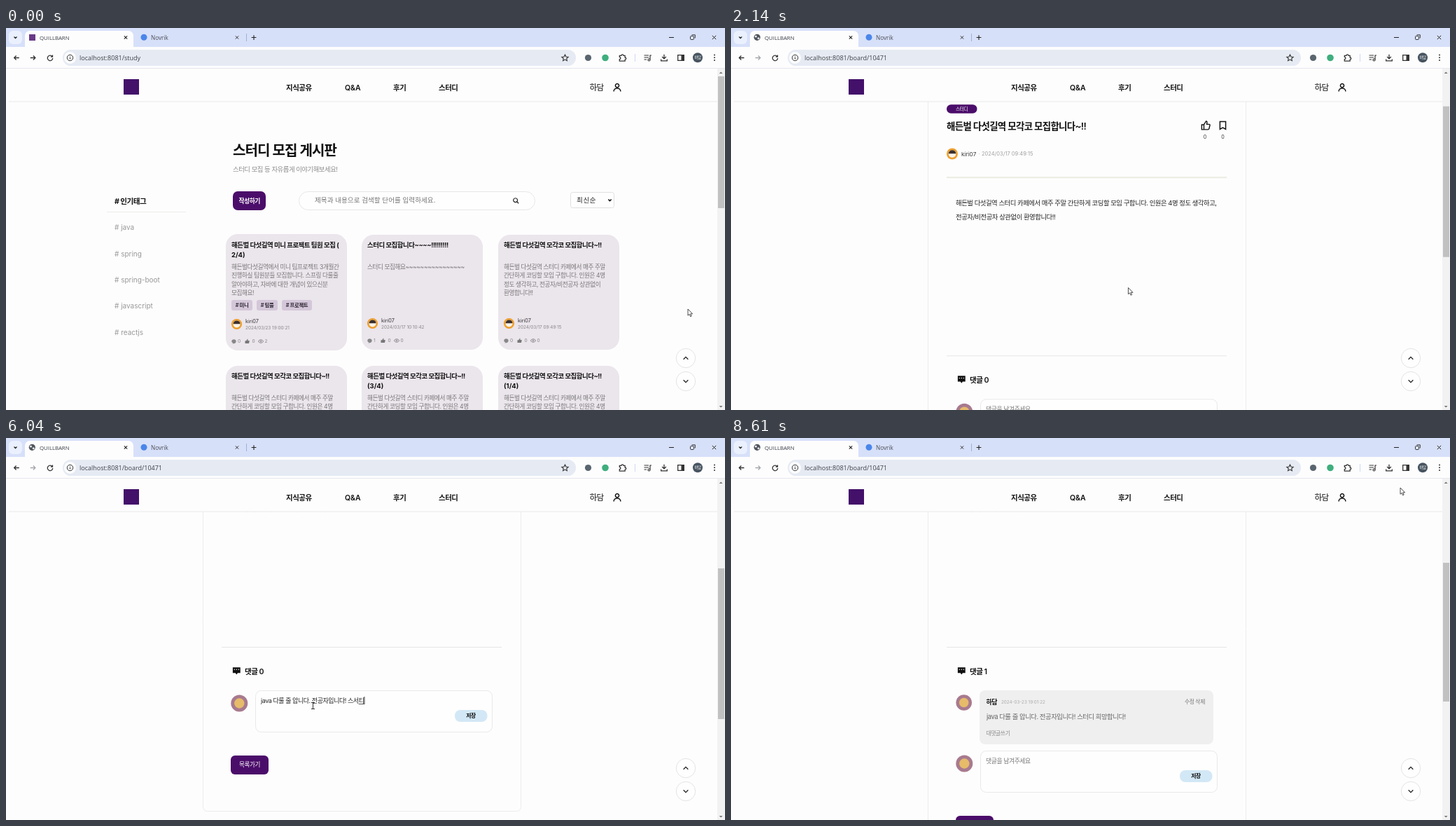
An HTML page with a canvas for the animation above (8.64 s loop, 1027 by 545 pixels).

```html
<!DOCTYPE html>
<html lang="ko">
<head>
<meta charset="utf-8">
<title>Study board</title>
<style>
  html, body { margin: 0; width: 100%; height: 100%; overflow: hidden; background: #fdfdfd; }
  canvas { display: block; width: 1027px; height: 545px; }
</style>
</head>
<body>
<canvas id="stage"></canvas>
<script>
const W = 1027, H = 545, LOOP = 8640;
const canvas = document.getElementById('stage');
const ctx = canvas.getContext('2d');
const dpr = window.devicePixelRatio || 1;
canvas.width = W * dpr;
canvas.height = H * dpr;

const PAGE_FONT = 'Inter, "Noto Sans CJK KR", "Noto Sans CJK", sans-serif';
const UI_FONT = '"Open Sans", "Noto Sans CJK KR", sans-serif';
const PURPLE = '#4b0d6a', PAGE = '#fdfdfd', GRAY = '#777', INK = '#111';
const SITE = 'QUILLBARN', MEMBER = '하담', AUTHOR = 'kiri07', STATION = '해든벌 다섯길역';
const CODING = STATION + ' 모각코 모집합니다~!!';

// Timeline in ms
const OPEN = 1150, DETECT = 1700, FOCUS = 2850, RELOAD = 7450, DETECT2 = 7700;
const SCROLL = 267;

const ICON = {
  star: 'M12 3l2.8 6 6.5.7-4.9 4.4 1.4 6.4-5.8-3.3-5.8 3.3 1.4-6.4L2.7 9.7 9.2 9z',
  thumb: 'M8 10v11H3V10zM8 10l5-8c2 0 2.5 1.5 2 3.5L14.5 9H20c1 0 2 1 1.7 2.2l-2 8c-.2 1-1 1.8-2 1.8H8',
  mark: 'M5 2h14v19l-7-4-7 4z',
  chat: 'M2 3h20v15h-7l-3 4-3-4H2z',
  bubble: 'M12 3C-1 3-1 19 9 19l-5 3c16 1 18-5 18-11 0-5-4-8-10-8z',
  eye: 'M1 12c5-9 17-9 22 0c-5 9-17 9-22 0zM12 9a3 3 0 1 0 .01 0z',
  user: 'M12 2a4.8 4.8 0 1 0 .01 0zM3 22c0-11 18-11 18 0',
  search: 'M10 3a7 7 0 1 0 .01 0zM15.5 15.5L21 21',
  back: 'M21 12H4M11 5l-7 7 7 7',
  next: 'M3 12h17M13 5l7 7-7 7',
  reload: 'M19 8A8.5 8.5 0 1 0 20.5 13M20 3v6h-6',
  puzzle: 'M4 6h5a3 3 0 1 1 6 0h4v5a3 3 0 1 1 0 6v4H4v-5a3 3 0 0 0 0-6z',
  list: 'M2 5h13M2 11h13M2 17h7M19 18V5h4M13 18a3 3 0 1 0 6 0 3 3 0 1 0-6 0',
  save: 'M12 2v13M6 9l6 6 6-6M3 16v5h18v-5',
  panel: 'M3 4h18v16H3z',
  up: 'M4 16l8-8 8 8',
  down: 'M4 8l8 8 8-8',
  close: 'M4 4l16 16M20 4L4 20',
  plus: 'M12 3v18M3 12h18'
};
for (const k in ICON) ICON[k] = new Path2D(ICON[k]);
const ARROW = new Path2D('M0 0v9.2l2.1-1.9 1.5 3.4 1.6-.7-1.5-3.2h2.9z');

function text(s, x, y, size, color = INK, weight = 400, o = {}) {
  const track = o.track ?? (/[가-힣]/.test(s) && o.font !== UI_FONT ? -0.05 : 0);
  ctx.font = `${weight} ${size}px ${o.font || PAGE_FONT}`;
  ctx.letterSpacing = track * size + 'px';
  ctx.textAlign = o.align || 'left';
  ctx.fillStyle = color;
  ctx.fillText(s, x, y + size * 0.37);
}

function box(x, y, w, h, r, fill, stroke) {
  ctx.beginPath();
  ctx.roundRect(x, y, w, h, r);
  if (fill) { ctx.fillStyle = fill; ctx.fill(); }
  if (stroke) { ctx.strokeStyle = stroke; ctx.lineWidth = 1; ctx.stroke(); }
}

function disc(x, y, r, fill, stroke) {
  box(x - r, y - r, 2 * r, 2 * r, r, fill, stroke);
}

function icon(name, x, y, size, color = '#222', width = 1.2, fill = false) {
  ctx.save();
  ctx.translate(x - size / 2, y - size / 2);
  ctx.scale(size / 24, size / 24);
  ctx.lineWidth = width * 24 / size;
  ctx.strokeStyle = ctx.fillStyle = color;
  if (fill) ctx.fill(ICON[name]); else ctx.stroke(ICON[name]);
  ctx.restore();
}

function authorPic(x, y, r) {
  disc(x, y, r, '#eda02f');
  disc(x, y, r * 0.66, '#fbf4ea');
  ctx.beginPath();
  ctx.arc(x, y, r * 0.66, Math.PI * 1.02, Math.PI * 1.98);
  ctx.fillStyle = '#3a3030';
  ctx.fill();
}

function memberPic(x, y, r) {
  disc(x, y, r, '#a87a8f');
  disc(x, y, r * 0.6, '#e6bb6a');
}

const ease = p => p * p * (3 - 2 * p);
const ramp = (t, a, b) => ease(Math.min(1, Math.max(0, (t - a) / (b - a))));

// Keystroke states, building each Hangul syllable from its letters
function keys(base, s) {
  const lead = 'ㄱㄲㄴㄷㄸㄹㅁㅂㅃㅅㅆㅇㅈㅉㅊㅋㅌㅍㅎ', out = [];
  for (const ch of s) {
    const c = ch.charCodeAt(0) - 0xAC00;
    if (c >= 0 && c < 11172) {
      out.push(base + lead[Math.floor(c / 588)]);
      if (c % 28) out.push(base + String.fromCharCode(0xAC00 + c - c % 28));
    }
    out.push(base += ch);
  }
  return out;
}

const PART1 = 'java 다룰 줄 압', PART2 = PART1 + '니다. 전공자입니다! 스';
const REPLY = PART2 + '터디 희망합니다!';
const TYPING = [
  [3050, 4240, keys('', PART1)],
  [4240, 6060, keys(PART1, '니다. 전공자입니다! 스서티')],
  [6060, 7060, [PART2 + '서ㅌ', PART2 + '서', PART2 + 'ㅅ', PART2, ...keys(PART2, '터디 희망합니다!')]]
];

function typed(t) {
  let s = '';
  for (const [a, b, list] of TYPING) {
    if (t >= a) s = list[Math.min(list.length - 1, Math.floor((t - a) / (b - a) * list.length))];
  }
  return s;
}

const TRAIL = [
  [0, 974, 401], [120, 974, 401], [850, 775, 350], [1150, 768, 348], [1500, 670, 352],
  [1900, 610, 362], [2400, 520, 380], [2800, 438, 382], [7060, 438, 382], [7300, 664, 394],
  [7430, 664, 394], [7810, 836, 135], [8550, 956, 71], [LOOP, 956, 71]
];

function pointer(t) {
  const i = TRAIL.findIndex(p => p[0] > t);
  const a = TRAIL[i - 1], b = TRAIL[i], p = ramp(t, a[0], b[0]);
  return [a[1] + (b[1] - a[1]) * p, a[2] + (b[2] - a[2]) * p];
}

const CALL = [STATION + ' 스터디 카페에서 매주 주말', '간단하게 코딩할 모임 구합니다. 인원은 4명',
  '정도 생각하고, 전공자/비전공자 상관없이', '환영합니다!!'];
const CARDS = [
  { x: 314, y: 295, title: [STATION + ' 미니 프로젝트 팀원 모집 (', '2/4)'],
    body: [STATION.replace(' ', '') + '에서 미니 팀프로젝트 3개월간', '진행하실 팀원분들 모집합니다. 스프링 다룰줄',
      '알아야하고, 자바에 대한 개념이 있으신분', '모집해요!'],
    date: '2024/03/23 19:00:21', chats: 0, views: 2, tags: true },
  { x: 508, y: 295, title: ['스터디 모집합니다~~~~!!!!!!!!!'], body: ['스터디 모집해요' + '~'.repeat(16)],
    date: '2024/03/17 10:10:42', chats: 1, views: 0 },
  { x: 703, y: 295, title: [CODING], body: CALL, date: '2024/03/17 09:49:15', chats: 0, views: 0 },
  { x: 314, y: 482, title: [CODING], body: CALL },
  { x: 508, y: 482, title: [CODING, '(3/4)'], body: CALL },
  { x: 703, y: 482, title: [CODING, '(1/4)'], body: CALL }
];

function drawCard({ x, y, title, body, date, chats, views, tags }) {
  const grow = tags ? 1 : 0, d = y + grow;
  box(x, y - grow, 173, 164 + 2 * grow, 17, '#ebe5ec');
  title.forEach((s, i) => text(s, x + 8, y + 14.7 + i * 13.6, 9.45, INK, 700));
  body.forEach((s, i) => text(s, x + 8, y + 46 + i * 12.2, 8.65, GRAY));
  if (tags) {
    [['# 미니', 8, 30], ['# 팀플', 44, 30], ['# 프로젝트', 80, 43]].forEach(([s, dx, w]) => {
      box(x + dx, y + 93, w, 15, 3, '#d3c7d9');
      text(s, x + dx + w / 2, y + 100.5, 7.4, '#2b2330', 600, { align: 'center' });
    });
  }
  if (!date) return;
  authorPic(x + 15.5, d + 126.5, 7.6);
  text(AUTHOR, x + 28, d + 122, 7.3, '#333');
  text(date, x + 28, d + 132, 6.4, '#888');
  const cy = d + 151;
  icon('bubble', x + 11.5, cy, 7.5, '#888', 1, true);
  icon('thumb', x + 30.5, cy, 8, '#777', 1, true);
  icon('eye', x + 50, cy, 8, '#888', 0.9);
  [[chats, 17], [0, 37.5], [views, 55.5]].forEach(([n, dx]) => text(String(n), x + dx, cy, 6.6, '#888'));
}

function drawStudy() {
  text('스터디 모집 게시판', 324, 174.5, 20.1, INK, 600);
  text('스터디 모집 등 자유롭게 이야기해보세요!', 324, 202, 9.4, '#8c8c8c');
  text('# 인기태그', 155, 247, 10.6, INK, 700);
  box(144, 262, 113, 1, 0, '#ececef');
  ['java', 'spring', 'spring-boot', 'javascript', 'reactjs'].forEach((s, i) =>
    text('# ' + s, 155, 284.5 + i * 37.4, 10, '#999'));
  box(324, 233, 47, 27, 7, PURPLE);
  text('작성하기', 347.7, 246.3, 8.8, '#fff', 600, { align: 'center' });
  box(418.5, 233.5, 337, 26, 13, '#fefefe', '#e7e7e7');
  text('제목과 내용으로 검색할 단어를 입력하세요.', 441, 245.7, 9.6, GRAY, 400, { track: 0 });
  icon('search', 728.5, 246.5, 10, '#222', 1.2);
  box(806.5, 234.5, 62, 22, 3, '#fefefe', '#e0e0e0');
  text('최신순', 815, 245, 9.6, '#222', 400, { track: 0.06 });
  icon('down', 862.5, 245.5, 6.5, '#111', 1.5);
  CARDS.forEach(drawCard);
}

function saveBox(y, content, focused) {
  memberPic(333.3, y + 18.5, 12);
  box(356.5, y + 0.5, 338, 59, 8, '#fefefe', '#e9e9e9');
  if (content) text(content, 364, y + 14.5, 9, '#222');
  else text('댓글을 남겨주세요', 364, y + 14.5, 8.9, GRAY);
  if (focused) {
    const width = s => ctx.measureText(s).width;
    const end = content ? 364 + width(content) : 364;
    if (/[ㄱ-힣]$/.test(content)) {
      const w = width(content.slice(-1));
      box(end - w, y + 19, w, 0.8, 0, '#222');
    }
    box(end, y + 9, 0.9, 11, 0, '#222');
  }
  box(641, y + 28, 46.5, 17, 8, '#d3e8f6');
  text('저장', 664, y + 36.5, 7.9, INK, 700, { align: 'center' });
}

function drawBoard(t, scroll) {
  const done = t >= RELOAD, extra = done ? 86 : 0;
  ctx.save();
  ctx.translate(0, -scroll);
  box(281.5, 164.5, 454, 635 + extra, 6, null, '#ececec');
  box(308, 207, 43.5, 12.5, 6.2, PURPLE);
  text('스터디', 329.7, 213.2, 6.6, '#fff', 500, { align: 'center' });
  text(CODING, 308, 237.5, 13.45, INK, 600);
  icon('thumb', 678, 237, 15, '#111', 1.4);
  icon('mark', 702.5, 237, 14, '#111', 1.5);
  text('0', 677, 253.5, 7.2, '#333', 400, { align: 'center' });
  text('0', 702.5, 253.5, 7.2, '#333', 400, { align: 'center' });
  authorPic(316, 277.3, 8);
  text(AUTHOR, 329, 277.5, 8.2, '#333');
  text('·', 353.5, 277.5, 7.5, '#999');
  text('2024/03/17 09:49:15', 358, 277.5, 7.5, '#a0a0a0');
  box(308, 310, 400, 2, 0, '#ebebe2');
  text(CALL[0] + ' ' + CALL[1] + ' 정도 생각하고,', 321, 347.3, 9.4, '#222');
  text('전공자/비전공자 상관없이 환영합니다!!', 321, 367.5, 9.4, '#222');

  ctx.translate(0, SCROLL);
  box(308, 298, 400, 1, 0, '#e6e6e6');
  icon('chat', 329.3, 332, 13, '#111', 1, true);
  [326.3, 329.3, 332.3].forEach(x => disc(x, 330.3, 0.7, '#fff'));
  text('댓글 ' + (done ? 1 : 0), 341, 332.7, 10.6, INK, 600);
  if (done) {
    memberPic(332.7, 377.5, 11.3);
    box(355, 360, 334, 77, 8, '#efeff0');
    text(MEMBER, 364.5, 377, 9, INK, 600);
    text('2024-03-23 19:01:22', 386, 377, 6.3, '#aaa');
    text('수정 삭제', 648, 376.5, 7.8, GRAY);
    text(REPLY, 365, 397.5, 9.4, '#666');
    text('대댓글쓰기', 364.5, 421, 7.8, '#888');
  }
  saveBox(360 + extra, done ? '' : typed(t), !done && t >= FOCUS);
  box(321, 453 + extra, 54, 27, 6, PURPLE);
  text('목록가기', 348, 466 + extra, 8.6, '#fff', 500, { align: 'center' });
  ctx.restore();
}

function drawHeader() {
  box(0, 58, 1016, 47, 0, PAGE);
  box(4, 104.5, 1012, 1, 0, '#e9e9e9');
  box(168, 73, 22, 22, 0, '#43106a');
  [['지식공유', 400], ['Q&A', 484], ['후기', 553], ['스터디', 618]].forEach(([s, x]) =>
    text(s, x, 85, 10.5, INK, 600));
  text(MEMBER, 833.5, 84.7, 11.6, INK, 500);
  icon('user', 873, 85, 13, '#111', 1.5);
}

function drawScrollbar(top, len) {
  box(1016, 58, 11, 487, 0, '#f2f2f2');
  box(1017, top, 9, len, 0, '#c1c1c1');
  ctx.fillStyle = '#777';
  [[64, -2], [540, 2]].forEach(([y, d]) => {
    ctx.beginPath();
    ctx.moveTo(1018.7, y - d / 2);
    ctx.lineTo(1023.7, y - d / 2);
    ctx.lineTo(1021.2, y + d / 2 + d * 0.3);
    ctx.fill();
  });
}

function drawBrowser(onBoard, detected) {
  const ui = { font: UI_FONT };
  box(0, 0, W, 27, 0, '#d7e0f9');
  box(4, 4, 19, 19, 6, '#eaf0fd');
  icon('down', 13.5, 13.5, 6, '#222', 1.3);
  box(27, 4, 155, 30, 7, '#fdfdfe');
  box(0, 27, W, 31, 0, '#fdfdfe');
  box(0, 57, W, 1, 0, '#e6e8ee');

  if (onBoard) {
    disc(37.3, 13.3, 4.6, '#50545b');
    disc(35.5, 12, 1.6, '#e4e6ea');
    disc(39.2, 14.8, 1.5, '#e4e6ea');
  } else box(33, 9, 9, 9, 0, '#6a3a86');
  text(SITE, 48, 14.3, 7.8, '#3b3e44', 400, ui);
  disc(197, 13.3, 4.5, '#4a86ea');
  text('Novrik', 207, 14.3, 8.2, '#4a4e58', 400, ui);
  icon('close', 171, 13.5, 6.5, '#222', 1.1);
  icon('close', 330, 13.5, 6.5, '#333', 1);
  box(343, 8, 1, 11, 0, '#a3b0d2');
  icon('plus', 354, 13.5, 9, '#222', 1.1);
  box(947, 13, 7, 1, 0, '#222');
  box(977.5, 11.5, 5, 5, 1, null, '#333');
  ctx.beginPath();
  ctx.moveTo(979.5, 9.8); ctx.lineTo(984.3, 9.8); ctx.lineTo(984.3, 14.5);
  ctx.stroke();
  icon('close', 1011.5, 13.5, 8, '#222', 1);

  icon('back', 15, 42.5, 10, '#333', 1.3);
  icon('next', 38.5, 42.5, 10, onBoard ? '#a6a8ac' : '#333', 1.3);
  icon('reload', 63, 42.5, 10.5, '#333', 1.3);
  box(81, 31, 733, 23, 11.5, '#e6eaf3');
  disc(91.5, 42.5, 8.5, '#fcfdff');
  disc(91.5, 42.5, 4.2, null, '#333');
  box(91, 42, 1, 2.6, 0, '#333');
  box(91, 40.2, 1, 1, 0, '#333');
  text('localhost:8081/' + (onBoard ? 'board/10471' : 'study'), 105, 42.6, 9, '#3f4248', 400, ui);
  icon('star', 798.5, 42.5, 12, '#333', 1.1);
  disc(831.5, 42.5, 4.6, '#59656f');
  disc(856, 42.5, 4.8, detected ? '#3fae7d' : '#a9adb0');
  icon('puzzle', 880.5, 42.5, 12.5, '#333', 1.3);
  box(898, 37, 1, 11, 0, '#cfd8ee');
  icon('list', 916.5, 42.5, 12, '#333', 1.2);
  icon('save', 940, 42.5, 11.5, '#333', 1.3);
  icon('panel', 964, 42.5, 11.5, '#333', 1.3);
  box(964.5, 38.5, 4.5, 8, 0, '#333');
  disc(988, 42.3, 7, '#475460');
  text(MEMBER, 988, 42.3, 5.6, '#fff', 400, { align: 'center' });
  [38.5, 42.3, 46.1].forEach(y => disc(1012, y, 1, '#333'));
}

function drawPointer(x, y, beam) {
  if (beam) {
    ctx.strokeStyle = '#333';
    ctx.lineWidth = 1;
    ctx.beginPath();
    ctx.moveTo(x - 2, y - 4.5); ctx.lineTo(x + 3, y - 4.5);
    ctx.moveTo(x + 0.5, y - 4.5); ctx.lineTo(x + 0.5, y + 4.5);
    ctx.moveTo(x - 2, y + 4.5); ctx.lineTo(x + 3, y + 4.5);
    ctx.stroke();
    return;
  }
  ctx.save();
  ctx.translate(x, y);
  ctx.fillStyle = '#fff';
  ctx.strokeStyle = '#222';
  ctx.lineWidth = 0.8;
  ctx.fill(ARROW);
  ctx.stroke(ARROW);
  ctx.restore();
}

function draw(t) {
  const onBoard = t >= OPEN, done = t >= RELOAD;
  const scroll = SCROLL * (done ? ramp(t, 8020, 8580) : ramp(t, 1850, 2560));
  ctx.setTransform(dpr, 0, 0, dpr, 0, 0);
  box(0, 0, W, H, 0, PAGE);
  if (onBoard) drawBoard(t, scroll); else drawStudy();
  [['up', 471], ['down', 504]].forEach(([name, y]) => {
    disc(971, y, 13.7, '#fefefe', '#e4e4e6');
    icon(name, 971, y, 10, '#222', 1.3);
  });
  drawHeader();
  if (!onBoard) drawScrollbar(69, 188);
  else if (done) drawScrollbar(69 + scroll * 109 / SCROLL, 198);
  else drawScrollbar(69 + scroll * 117 / SCROLL, 215);
  drawBrowser(onBoard, !onBoard || (t >= DETECT && !done) || t >= DETECT2);

  const [x, y] = pointer(t), top = 627 - scroll;
  const inBox = x > 356 && x < 695 && y > top && y < top + 60;
  const onSave = x > 640 && x < 688 && y > top + 27 && y < top + 46;
  drawPointer(x, y, onBoard && !done && inBox && !onSave);
}

const start = performance.now();
function tick() {
  draw((performance.now() - start) % LOOP);
  requestAnimationFrame(tick);
}
tick();
</script>
</body>
</html>
```
